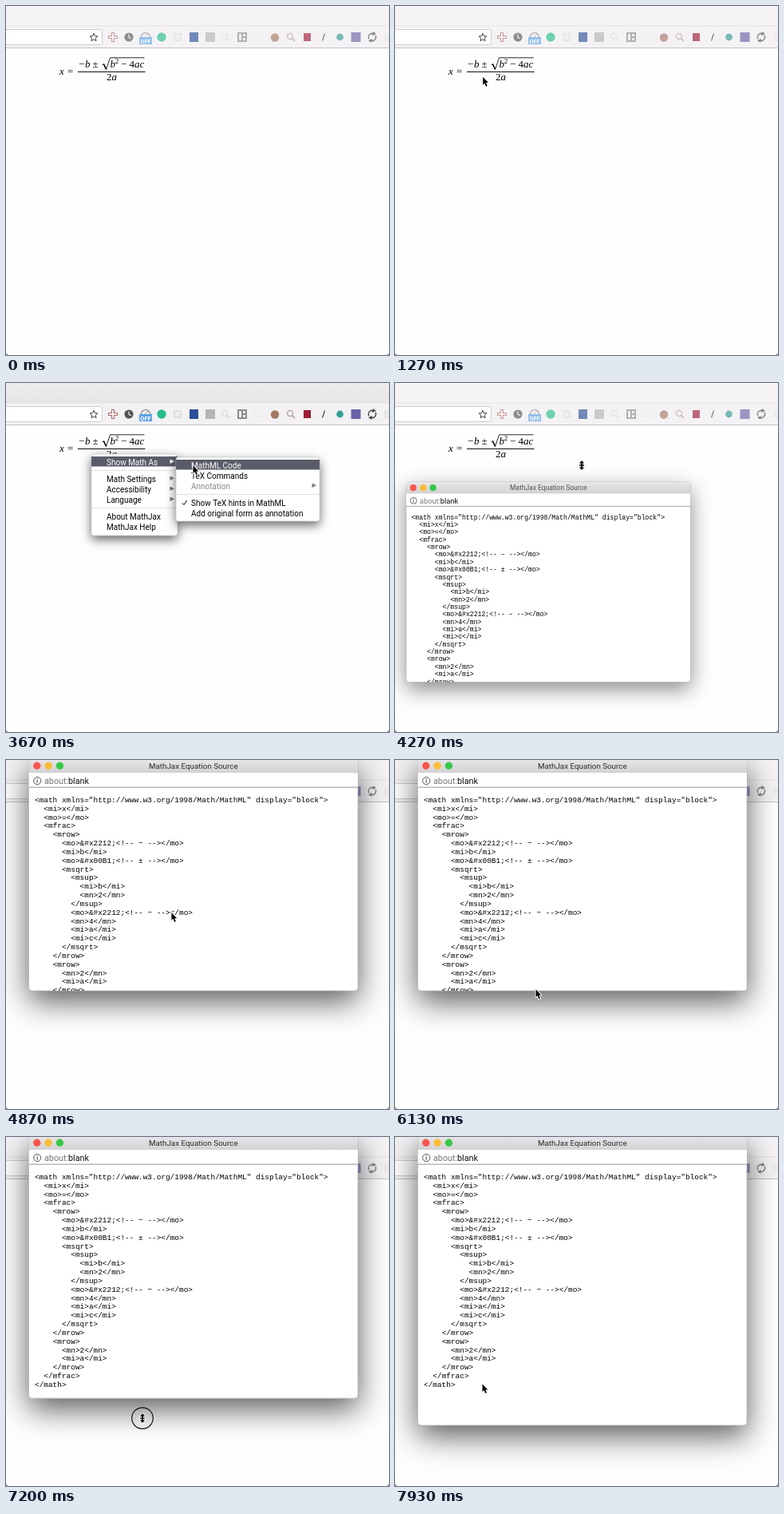
Recreate the animation shown at these times as an HTML page with a canvas. Size 480 by 437 pixels, loop 8 s.

```html
<!DOCTYPE html>
<html lang="en">
<head>
<meta charset="utf-8">
<title>Equation menu</title>
<style>
html, body { margin: 0; width: 100%; height: 100%; overflow: hidden; background: #fefefe; }
canvas { display: block; width: 480px; height: 437px; }
</style>
</head>
<body>
<canvas id="stage"></canvas>
<script>
const W = 480, H = 437, LOOP = 8000;
const canvas = document.getElementById('stage');
const ctx = canvas.getContext('2d');
const dpr = window.devicePixelRatio || 1;
canvas.width = W * dpr;
canvas.height = H * dpr;

const UI = 'Roboto, sans-serif';
const MONO = '"Liberation Mono", monospace';
const SERIF = '"Liberation Serif", serif';

const lerp = (a, b, p) => a + (b - a) * p;
const clamp = p => Math.max(0, Math.min(1, p));
const ease = p => p * p * (3 - 2 * p);

function text(s, x, y, font, color = '#000', align = 'left') {
  ctx.font = font;
  ctx.fillStyle = color;
  ctx.textAlign = align;
  ctx.fillText(s, x, y);
}
function rect(x, y, w, h, color) {
  ctx.fillStyle = color;
  ctx.fillRect(x, y, w, h);
}
function disc(x, y, r, color) {
  ctx.beginPath();
  ctx.arc(x, y, r, 0, 7);
  ctx.fillStyle = color;
  ctx.fill();
}
function arc(x, y, r, from, to, color, width = 1) {
  ctx.beginPath();
  ctx.arc(x, y, r, from, to);
  ctx.strokeStyle = color;
  ctx.lineWidth = width;
  ctx.stroke();
}
function ring(x, y, r, color, width) {
  arc(x, y, r, 0, 7, color, width);
}
function path(points, color, width = 1, closed = false) {
  ctx.beginPath();
  points.forEach(([x, y]) => ctx.lineTo(x, y));
  if (closed) ctx.closePath();
  ctx.strokeStyle = color;
  ctx.lineWidth = width;
  ctx.stroke();
}
function poly(points, color) {
  ctx.beginPath();
  points.forEach(([x, y]) => ctx.lineTo(x, y));
  ctx.fillStyle = color;
  ctx.fill();
}
function fade(y, h, top, bottom) {
  const g = ctx.createLinearGradient(0, y, 0, y + h);
  g.addColorStop(0, top);
  g.addColorStop(1, bottom);
  return g;
}
function roundBox(x, y, w, h, r) {
  ctx.beginPath();
  ctx.roundRect(x, y, w, h, r);
}
function shadowBox(x, y, w, h, r, alpha, blur, dy) {
  ctx.save();
  ctx.shadowColor = `rgba(0,0,0,${alpha})`;
  ctx.shadowBlur = blur * dpr;
  ctx.shadowOffsetY = dy * dpr;
  roundBox(x, y, w, h, r);
  ctx.fillStyle = '#fff';
  ctx.fill();
  ctx.restore();
}

function drawIcons() {
  const star = Array.from({ length: 10 }, (_, i) => {
    const a = i * Math.PI / 5 - Math.PI / 2, r = i % 2 ? 2.3 : 5.2;
    return [110 + r * Math.cos(a), 39.5 + r * Math.sin(a)];
  });
  path(star, '#444', 1, true);

  rect(132, 33, 4, 12, '#a56b68');
  rect(128, 37, 12, 4, '#a56b68');
  rect(133, 34, 2, 10, '#f8eeee');
  rect(129, 38, 10, 2, '#f8eeee');

  disc(154, 39, 5.6, '#555');
  path([[154, 35.5], [154, 39.5], [157, 40.5]], '#f4f4f4', 1.2);

  arc(175, 39, 5.5, Math.PI, 0, '#999', 1.5);
  path([[174, 39], [178, 35]], '#999');
  rect(167, 39, 16, 9, '#5ba3e6');
  text('OFF', 175, 46.5, `bold 7.5px ${UI}`, '#fff', 'center');

  disc(195, 39, 5.7, '#25bd8b');
  rect(210, 34, 10, 10, '#dedede');
  rect(212, 36, 6, 6, '#eee');
  rect(230, 33, 11, 12, '#2b4f98');
  rect(250, 33, 12, 12, '#b4b4b4');

  const lens = (x, color) => {
    ring(x - 1, 38, 3.5, color, 1.4);
    path([[x + 1.5, 40.5], [x + 5, 44]], color, 1.8);
  };
  lens(275, '#dedede');
  rect(290, 33, 12, 12, '#8b8b8b');
  rect(292, 35, 3, 8, '#eee');
  rect(297, 35, 3, 3, '#eee');
  rect(297, 40, 3, 3, '#eee');
  ring(317, 39, 4.5, '#e9e9e9');
  disc(337, 39.5, 5.2, '#a57864');
  lens(357, '#b4aaa4');
  rect(373, 34, 9, 10, '#9e1c36');
  path([[396.5, 43.5], [399.5, 34.5]], '#333', 1.1);
  disc(418.5, 39, 4.4, '#359d93');
  rect(432.5, 33, 12, 12, '#6a62a8');

  arc(459, 39, 4.6, -0.5, 2, '#4a4a4a', 1.5);
  arc(459, 39, 4.6, 2.64, 5.14, '#4a4a4a', 1.5);
  poly([[454, 43], [459, 41], [458, 46]], '#4a4a4a');
  poly([[464, 35], [459, 37], [460, 32]], '#4a4a4a');
  rect(474, 34, 6, 10, '#e7e7e7');
}

// active: 1 when the browser window has focus, 0 when it is in the background
function drawBrowser(active) {
  rect(0, 0, W, H, '#fefefe');
  rect(0, 0, W, 25, '#f5f3f5');
  ctx.globalAlpha = active;
  rect(0, 0, W, 25, fade(0, 25, '#eeecee', '#e7e5e7'));
  ctx.globalAlpha = 1;
  rect(0, 24.5, W, 1, '#dedcde');
  rect(0, 25.5, W, 26.5, '#f3f1f3');
  rect(0, 52, W, 1, '#c6c4c6');
  roundBox(-6, 29.5, 126.5, 19, 3);
  ctx.fillStyle = '#fff';
  ctx.fill();
  ctx.strokeStyle = '#d0ced0';
  ctx.lineWidth = 1;
  ctx.stroke();
  drawIcons();
  rect(122, 26, W, 26, `rgba(246,244,246,${0.35 * (1 - active)})`);
  poly([[0, H - 3], [0, H], [3, H]], '#aaa');
  poly([[W, H - 3], [W, H], [W - 3, H]], '#aaa');
}

function drawEquation() {
  const up = `13px ${SERIF}`, it = `italic 13px ${SERIF}`;
  text('x', 67, 86, it);
  text('=', 77, 86, up);
  text('−', 91, 76.5, up);
  text('b', 99, 76.5, it);
  text('±', 108.5, 76.5, up);
  text('b', 130.5, 76.5, it);
  text('2', 136.8, 72, `9px ${SERIF}`);
  text('−', 144, 76.5, up);
  text('4', 154.5, 76.5, up);
  text('ac', 161, 76.5, it);
  text('2', 126, 93.4, up);
  text('a', 132.5, 93.4, it);
  rect(90, 82, 84.5, 1, '#111');
  path([[120.5, 74], [122.5, 72.5], [125.5, 79.5], [130.5, 64.8], [173.5, 64.8]], '#111', 0.9);
  path([[122.5, 72.8], [125.4, 79]], '#000', 1.5);
}

const MAIN_MENU = {
  x: 107, y: 89, w: 108, h: 102, lines: [109, 156],
  items: [['Show Math As', 99, 1], ['Math Settings', 120, 1], ['Accessibility', 133, 1],
    ['Language', 146, 1], ['About MathJax', 167], ['MathJax Help', 180]]
};
const SUB_MENU = {
  x: 213, y: 93, w: 180, h: 80, lines: [139],
  items: [['MathML Code', 103], ['TeX Commands', 116], ['Annotation', 129, 1, '#8a8a8a'],
    ['Show TeX hints in MathML', 150], ['Add original form as annotation', 163]]
};

function drawMenu(menu, active) {
  const { x, y, w, h } = menu;
  shadowBox(x, y, w, h, 3, 0.6, 13, 5);
  roundBox(x, y, w, h, 3);
  ctx.strokeStyle = '#ccc';
  ctx.lineWidth = 0.7;
  ctx.stroke();
  menu.lines.forEach(ly => rect(x, ly, w, 1, '#dfdfdf'));
  menu.items.forEach(([label, cy, arrow, color = '#000'], i) => {
    const on = i === active;
    if (on) rect(x, cy - 7, w, 12.5, '#5a5d69');
    text(label, x + 19, cy + 3.5, `10px ${UI}`, on ? '#fff' : color);
    const ax = x + w - 9.5;
    if (arrow) poly([[ax, cy - 3.5], [ax + 5.5, cy - 0.7], [ax, cy + 2.1]], on ? '#fff' : '#777');
  });
  if (menu === SUB_MENU) path([[221, 150.3], [223, 152.5], [226.5, 147]], '#000', 1);
}

// Each entry: indent level, then the markup of the line
const MARKUP = `0<math xmlns="http://www.w3.org/1998/Math/MathML" display="block">
1<mi>x</mi>
1<mo>=</mo>
1<mfrac>
2<mrow>
3<mo>&#x2212;<!-- − --></mo>
3<mi>b</mi>
3<mo>&#x00B1;<!-- ± --></mo>
3<msqrt>
4<msup>
5<mi>b</mi>
5<mn>2</mn>
4</msup>
4<mo>&#x2212;<!-- − --></mo>
4<mn>4</mn>
4<mi>a</mi>
4<mi>c</mi>
3</msqrt>
2</mrow>
2<mrow>
3<mn>2</mn>
3<mi>a</mi>
2</mrow>
1</mfrac>
0</math>`.split('\n');

function drawWindow(p, h) {
  const s = lerp(0.864, 1, p), w = 412.5;
  ctx.save();
  ctx.translate(lerp(14, 28.5, p), lerp(124, -1, p));
  ctx.scale(s, s);
  shadowBox(0, 0, w, h, 4, lerp(0.45, 0.65, p), lerp(26, 38, p), lerp(9, 13, p));
  roundBox(0, 0, w, h, 4);
  ctx.strokeStyle = '#b5b5b5';
  ctx.lineWidth = 0.8;
  ctx.stroke();
  ctx.clip();

  rect(0, 0, w, 17, fade(0, 17, '#e8e6e8', '#d3d1d3'));
  rect(0, 17, w, 18, '#fff');
  rect(0, 34.5, w, 1.5, '#b9b9b9');
  ['#f9564f', '#fbbc35', '#37c848'].forEach((c, i) => disc(10.3 + i * 14.3, 8.3, 4.7, c));
  const g = Math.round(lerp(85, 45, p));
  text('MathJax Equation Source', w / 2, 11.8, `9.8px ${UI}`, `rgb(${g},${g},${g})`, 'center');

  ring(10.7, 27, 4.6, '#555', 1);
  rect(10.1, 26.2, 1.2, 3.4, '#555');
  rect(10.1, 24.2, 1.2, 1.2, '#555');
  text('about:', 19.5, 30.8, `10.8px ${UI}`, '#777');
  text('blank', 49.5, 30.8, `10.8px ${UI}`, '#111');

  MARKUP.forEach((line, i) => {
    text(line.slice(1), 7.5 + line[0] * 11.32, 54 + i * 10.83, `9.43px ${MONO}`);
  });
  ctx.restore();
}

// Pointer stops: time, x, y
const STOPS = [
  [0, 205, 470], [60, 203, 450], [870, 112, 92], [1000, 110, 89], [1730, 109, 88], [2730, 109, 88],
  [2950, 150, 98], [3250, 205, 99], [3530, 234, 103], [4470, 234, 103], [5270, 180, 278],
  [5470, 179, 279], [6000, 176, 287], [6330, 176, 287], [6600, 171, 290], [6870, 171, 290],
  [7200, 171, 352], [7330, 171, 362], [7600, 171, 362], [7920, 109, 309], [8000, 109, 309]
];
function pointerAt(t) {
  let i = 0;
  while (i < STOPS.length - 2 && t >= STOPS[i + 1][0]) i++;
  const [t0, x0, y0] = STOPS[i], [t1, x1, y1] = STOPS[i + 1];
  const raw = clamp((t - t0) / (t1 - t0));
  const p = t0 >= 6870 && t0 < 7300 ? raw : ease(raw);
  return [lerp(x0, x1, p), lerp(y0, y1, p)];
}

function drawPointer(t) {
  const [x, y] = pointerAt(t);
  const within = (a, b) => t >= a && t < b;
  const sizing = within(4200, 4400) || within(6450, 7650);
  const pressed = within(1870, 2010) || within(3800, 3950) || within(6680, 7530);
  ctx.save();
  ctx.translate(x, y);
  ctx.lineJoin = 'round';
  if (pressed) ring(0, 0, 13.3, '#111', 1.2);
  const shape = sizing
    ? [[0, -6], [3.2, -2.4], [0.9, -2.4], [0.9, -0.7], [3, -0.7], [3, 0.7], [0.9, 0.7], [0.9, 2.4], [3.2, 2.4],
      [0, 6], [-3.2, 2.4], [-0.9, 2.4], [-0.9, 0.7], [-3, 0.7], [-3, -0.7], [-0.9, -0.7], [-0.9, -2.4], [-3.2, -2.4]]
    : [[0.5, 0.3], [0.5, 10], [2.6, 8], [4.3, 12], [6, 11.3], [4.3, 7.4], [7.3, 7.4]];
  path(shape, '#fff', 1.8, true);
  poly(shape, '#000');
  ctx.restore();
}

function draw(t) {
  ctx.setTransform(dpr, 0, 0, dpr, 0, 0);
  const open = t >= 4235;
  const grow = ease(clamp((t - 4290) / 100));
  drawBrowser(t >= 1330 && !open ? 1 : 0);
  drawEquation();
  if (t >= 1930 && t < 3960) {
    drawMenu(MAIN_MENU, t >= 2850 ? 0 : -1);
    if (t >= 2950) drawMenu(SUB_MENU, t >= 3330 ? 0 : -1);
  }
  if (open) {
    // The lower edge trails the dragged pointer
    const edge = t < 6870 ? 289 : Math.max(289, pointerAt(Math.min(t - 128, 7500))[1] - 1);
    drawWindow(grow, edge + 1);
  }
  drawPointer(t);
}

const start = performance.now();
function tick() {
  draw((performance.now() - start) % LOOP);
  requestAnimationFrame(tick);
}
tick();
</script>
</body>
</html>
```
